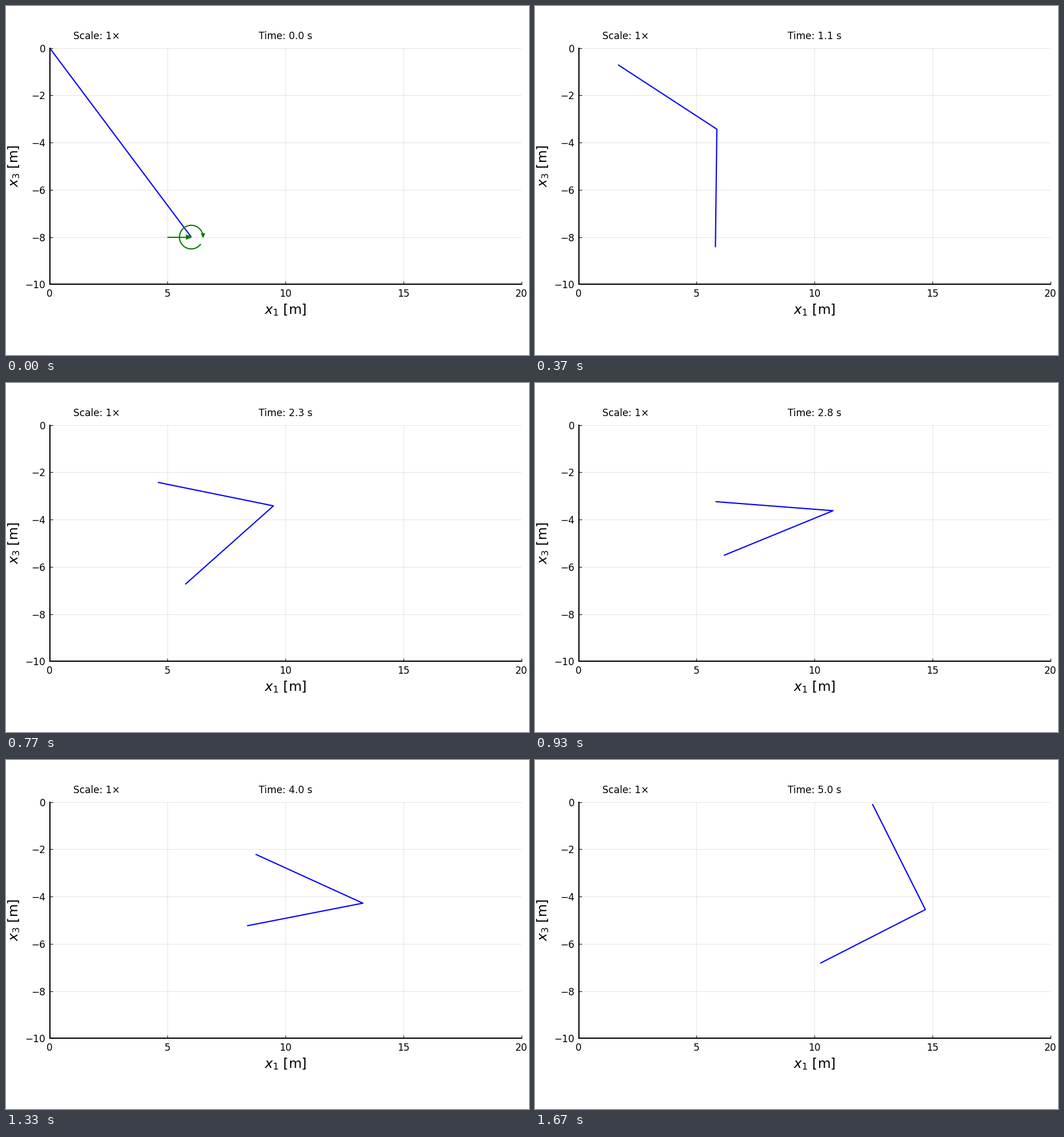
Write a matplotlib script that moves like this. It is 917 px wide and 611 px high and loops after 1.71 s.

```python
import numpy as np
import matplotlib.pyplot as plt
from matplotlib.animation import FuncAnimation
from matplotlib.patches import Polygon

W, H, DPI = 917, 611, 152.8
LINK = 5.0          # length of each of the two hinged links
STEPS = 50          # simulated steps of 0.1 s
TICK = 10           # ms per animation tick
LOOP = 1710         # ms per loop
PULSE = 0.5         # duration of the triangular load pulse, s
SPEED = 2.11        # drift of the mass centre after the pulse, m/s

plt.rcParams.update({"font.family": "DejaVu Sans", "font.size": 8,
                     "mathtext.fontset": "dejavusans"})


def travel(t):
    """Distance per unit final speed under a triangular pulse."""
    half = PULSE / 2
    c = 1 / (6 * half ** 2)
    if t < half:
        return c * t ** 3
    return t - half + c * max(PULSE - t, 0) ** 3


# Link angles (degrees, seen from the hinge) as smooth curves of the travel.
keys = [travel(t) for t in (0, 1.1, 1.7, 2.3, 3.4, 4.0, 5.0)]
loaded = np.polyfit(keys, [-53.13, -90.69, -114.95, -138.34,
                           -181.11, -204.45, -243.31], 5)
free = np.polyfit(keys, [126.87, 146.96, 158.66, 168.53,
                         183.33, 191.04, 207.0], 5)


def direction(curve, s):
    a = np.radians(np.polyval(curve, s))
    return np.array([np.cos(a), np.sin(a)])


def pose(t):
    """Free end, hinge and loaded end at time t."""
    s = travel(t)
    u, v = direction(loaded, s), direction(free, s)
    hinge = np.array([3 + SPEED * s, -4]) - LINK / 4 * (u + v)
    return np.array([hinge + LINK * v, hinge, hinge + LINK * u])


fig = plt.figure(figsize=((W + 0.001) / DPI, (H + 0.001) / DPI), dpi=DPI,
                 facecolor="white")
left, right, top, bottom = 76.7, 903.7, 73.7, 487.3
ax = fig.add_axes([left / W, 1 - bottom / H, (right - left) / W, (bottom - top) / H])
ax.set(xlim=(0, 20), ylim=(-10, 0), xticks=range(0, 21, 5), yticks=range(-10, 1, 2))
ax.set_xlabel("$x_1$ [m]", fontsize=11, labelpad=2.8)
ax.set_ylabel("$x_3$ [m]", fontsize=11, labelpad=2.8)
ax.tick_params(direction="in", length=2.5, width=0.5)
ax.set_axisbelow(True)
ax.grid(color="black", alpha=0.1, linewidth=0.5)
for side in ("top", "right"):
    ax.spines[side].set_visible(False)
for side in ("left", "bottom"):
    ax.spines[side].set_linewidth(1)

ax.text(2, 0.5, "Scale: 1×", ha="center", va="center")
clock = ax.text(10, 0.5, "", ha="center", va="center")
beam, = ax.plot([], [], color="blue", lw=1, solid_capstyle="butt",
                solid_joinstyle="round")

# Force arrow and clockwise moment arrow, relative to the loaded end.
turn = np.radians(np.linspace(-36, -360, 80))
force = np.array([[-1, 0], [0, 0]])
moment = 0.5 * np.column_stack([np.cos(turn), np.sin(turn)])
force_head = np.array([[0, 0], [-0.2, 0.078], [-0.2, -0.078]])
moment_head = np.array([[0.5, 0], [0.446, 0.138], [0.554, 0.138]])

strokes = [(ax.plot([], [], color="green", lw=1, solid_capstyle="butt", zorder=4)[0], p)
           for p in (force, moment)]
heads = [(ax.add_patch(Polygon(p, color="green", lw=1, zorder=5)), p)
         for p in (force_head, moment_head)]


def update(i):
    step = min((3 * i + 1) // 10, STEPS)
    t = step / 10
    points = pose(t)
    beam.set_data(*points.T)
    clock.set_text(f"Time: {t:.1f} s")
    pushed = t <= PULSE
    for line, shape in strokes:
        line.set_data(*(shape + points[2]).T)
        line.set_visible(pushed)
    for patch, shape in heads:
        patch.set_xy(shape + points[2])
        patch.set_visible(pushed)
    return [beam, clock] + [a for a, _ in strokes + heads]


anim = FuncAnimation(fig, update, frames=LOOP // TICK, interval=TICK,
                     repeat=True, repeat_delay=0, blit=False)
plt.show()
```
